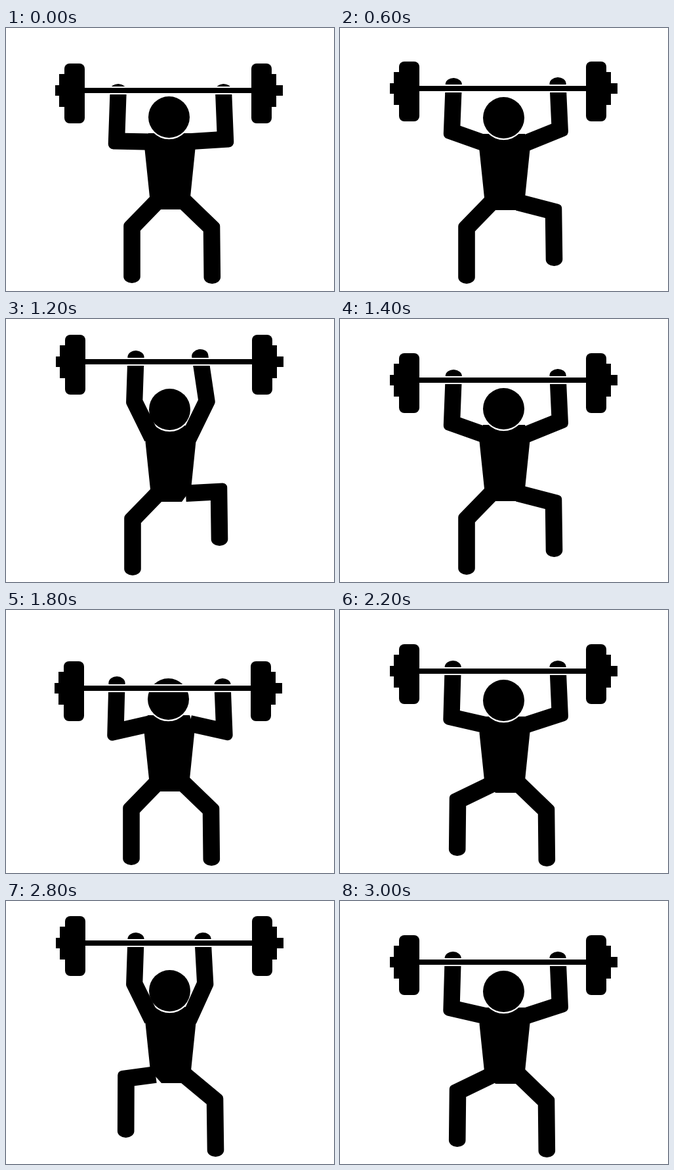
An HTML page with a canvas for the animation above (3200 ms loop, 500x400 px).

```html
<!DOCTYPE html>
<html lang="en">
<head>
<meta charset="utf-8">
<title>Barbell press</title>
<style>
html, body { margin: 0; width: 100%; height: 100%; overflow: hidden; background: #fff; }
canvas { display: block; }
</style>
</head>
<body>
<canvas id="stage" width="500" height="400"></canvas>
<script>
const ctx = document.getElementById('stage').getContext('2d');
const STEP = 200;

const shift = (pts, dx, dy) => pts.map((v, i) => v + (i % 2 ? dy : dx));

// Limbs run root -> joint -> tip, as x,y pairs.
const LEG_L = [227.5, 266.5, 192, 303, 192, 378];
const LEG_R = [274, 266, 313.5, 304, 314.3, 379];
const ARM_UP_L = [221, 177, 195.7, 125.7, 198, 58];

const rest = {
  x: 0, y: 0, bar: 95,
  armL: [216, 173, 168.5, 172, 171.2, 95],
  armR: [283, 172.5, 334.5, 169.3, 331.5, 95],
  legL: LEG_L, legR: LEG_R
};
const dip = {
  x: -1, y: 0, bar: 119,
  armL: [215, 174, 167, 185, 169, 111],
  armR: [284, 173.5, 332.8, 184.5, 330, 114],
  legL: shift(LEG_L, -1, 0), legR: shift(LEG_R, -1, 0)
};
const liftR = {
  x: 1, y: 1, bar: 92,
  armL: [216.5, 173.7, 170.5, 157.5, 173.3, 86],
  armR: [287, 173.5, 335.2, 154, 332, 85],
  legL: shift(LEG_L, 1, 1),
  legR: [275, 266, 325.5, 279, 326.5, 352]
};
const highR = {
  x: 1, y: 2, bar: 65,
  armL: ARM_UP_L,
  armR: [280, 178, 306, 125, 295.7, 56],
  legL: shift(LEG_L, 1, 2),
  legR: [278, 265, 324.5, 262.5, 325.5, 335]
};
const topR = {
  x: 1, y: 3, bar: 45,
  armL: [222, 179, 204, 107, 202, 38],
  armR: [280, 179, 297, 107, 295, 37],
  legL: shift(LEG_L, 1, 3),
  legR: [278, 264, 323, 247, 324, 320]
};
const lowerR = {
  ...liftR, bar: 93,
  armL: shift(liftR.armL, 0, 1), armR: shift(liftR.armR, 0, 1)
};
const liftL = {
  x: 1, y: 2, bar: 93,
  armL: [218, 174, 170, 163, 172.2, 87],
  armR: [286, 174, 335.2, 158, 332, 87],
  legL: [227, 267, 179.5, 290, 178.7, 364],
  legR: shift(LEG_R, 1, 1)
};
const highL = {
  x: 1, y: 1, bar: 64,
  armL: ARM_UP_L,
  armR: [280, 178, 303.7, 125.7, 300, 58],
  legL: [224, 264.5, 183, 270, 182.7, 350],
  legR: [274.5, 266.5, 318.5, 303, 319.5, 379]
};
const topL = {
  x: 1, y: 1, bar: 43,
  armL: [222, 177, 204, 105, 202, 36],
  armR: [279, 177, 296, 105, 297, 36],
  legL: [224, 264, 183, 253, 182.5, 334],
  legR: highL.legR
};
const restHigh = {
  ...rest, bar: 93,
  armL: shift(liftL.armL, -1, 0), armR: shift(liftL.armR, -1, 0)
};

const cycle = [
  rest, dip, rest, liftR, highR, topR, highR, lowerR,
  restHigh, dip, restHigh, liftL, highL, topL, highL, liftL
];

function limb([sx, sy, ex, ey, tx, ty], w, r) {
  const a = Math.atan2(ey - sy, ex - sx);
  const b = Math.atan2(ty - ey, tx - ex);
  const turn = Math.atan2(Math.sin(b - a), Math.cos(b - a));
  const s = turn > 0 ? 1 : -1;
  const side = (x, y, ang, k) => [x + k * s * Math.sin(ang), y - k * s * Math.cos(ang)];
  const mid = a + turn / 2, miter = w / Math.cos(turn / 2);
  // Tuck the root under the torso to hide the seam.
  const rx = sx - 4 * Math.cos(a), ry = sy - 4 * Math.sin(a);

  ctx.beginPath();
  ctx.moveTo(...side(rx, ry, a, w));
  ctx.arcTo(...side(ex, ey, mid, miter), ...side(tx, ty, b, w), r);
  ctx.ellipse(tx, ty, 10, w, b, -s * Math.PI / 2, s * Math.PI / 2, s < 0);
  ctx.lineTo(...side(ex, ey, mid, -miter));
  ctx.lineTo(...side(rx, ry, a, -w));
  ctx.closePath();
  ctx.fill();
}

function disc(x, y, r, color) {
  ctx.fillStyle = color;
  ctx.beginPath();
  ctx.arc(x, y, r, 0, Math.PI * 2);
  ctx.fill();
}

function torso(dx, dy) {
  const pts = [217, 160, 281, 160, 288.5, 184, 281, 257, 267, 276, 236, 276, 219, 257, 211.5, 185];
  ctx.beginPath();
  for (let i = 0; i < pts.length; i += 2) ctx.lineTo(pts[i] + dx, pts[i + 1] + dy);
  ctx.fill();
}

function barbell(dx, y) {
  const block = (x, w, h) => ctx.fillRect(x + dx, y - h / 2, w, h);
  ctx.fillStyle = '#fff';
  block(120, 254, 12);
  ctx.fillStyle = '#000';
  block(118, 258, 8);
  block(75, 10, 16);
  block(81, 12, 50);
  block(401, 11, 50);
  block(410, 12, 16);
  for (const x of [89, 374]) {
    ctx.beginPath();
    ctx.roundRect(x + dx, y - 41, 31, 91, 8);
    ctx.fill();
  }
}

function draw(p) {
  ctx.fillStyle = '#fff';
  ctx.fillRect(0, 0, 500, 400);
  ctx.fillStyle = '#000';
  torso(p.x, p.y);
  limb(p.legL, 12.8, 7);
  limb(p.legR, 12.8, 7);
  disc(248.5 + p.x, 135.5 + p.y, 33.7, '#fff');
  disc(248.5 + p.x, 135.5 + p.y, 31.5, '#000');
  limb(p.armL, 12.6, 8);
  limb(p.armR, 12.6, 8);
  barbell(p.x, p.bar);
}

const start = performance.now();
function tick() {
  const t = Math.max(0, performance.now() - start);
  draw(cycle[Math.floor(t / STEP) % cycle.length]);
  requestAnimationFrame(tick);
}
tick();
</script>
</body>
</html>
```
